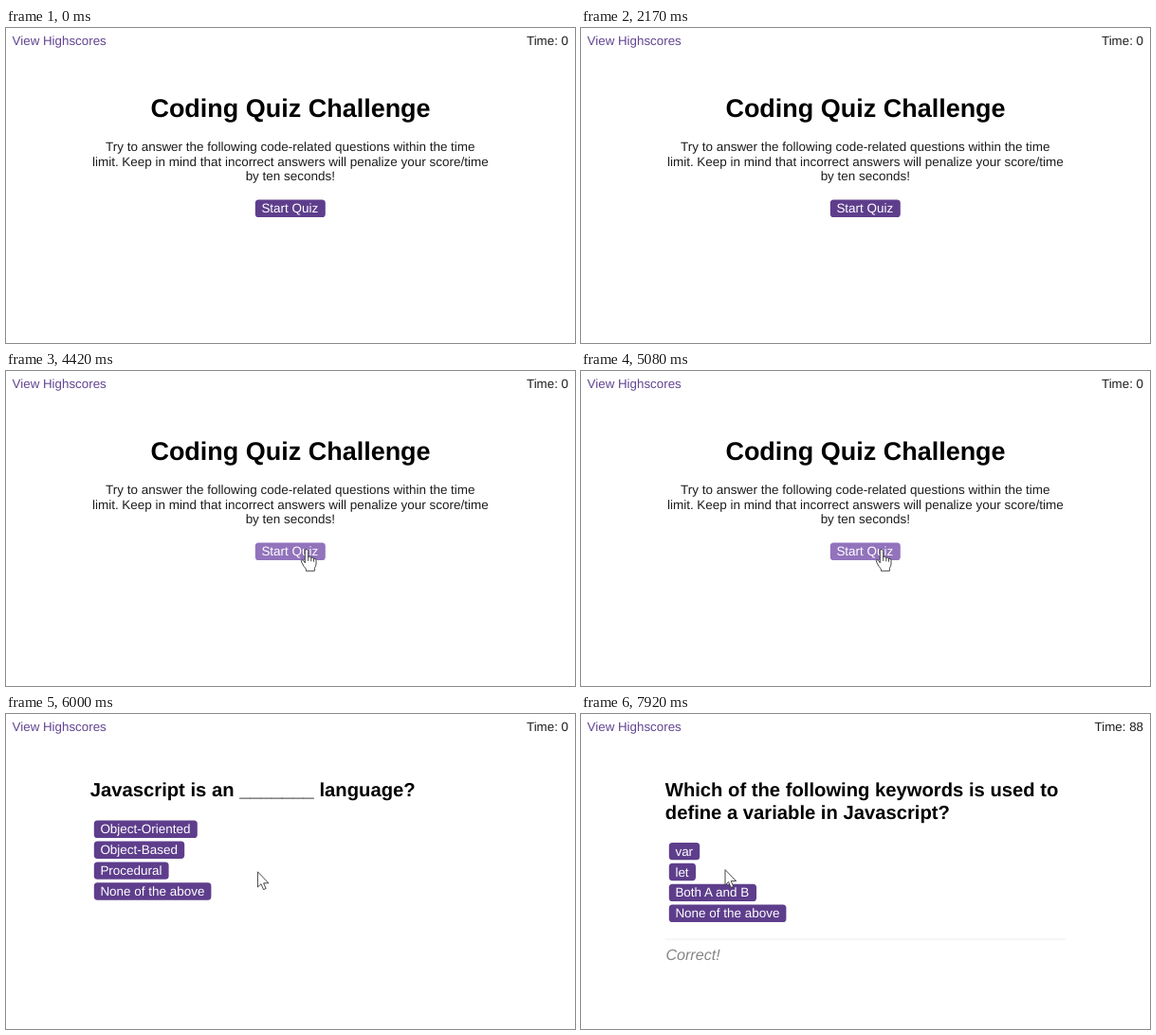
Animation, 600 px wide and 333 px high, one loop 8 s. Source, as an HTML page:

```html
<!DOCTYPE html>
<html lang="en">
<head>
<meta charset="utf-8">
<title>Coding Quiz Challenge</title>
<style>
  html, body { margin: 0; width: 100%; height: 100%; overflow: hidden; background: #fff; }
  svg { display: block; width: 600px; height: 333px; }
  text {
    font: 13.48px "Liberation Sans", Arial, sans-serif;
    fill: #1c1c1c;
    text-rendering: geometricPrecision;
  }
  .link { font-size: 13.35px; fill: #624491; }
  .clock { font-size: 13.35px; text-anchor: end; }
  .title { font-size: 26.97px; font-weight: bold; fill: #000; text-anchor: middle; }
  .intro { text-anchor: middle; }
  .question { font-size: 20.23px; font-weight: bold; fill: #000; }
  .result { font-size: 16.1px; font-style: italic; fill: #858585; }
  .button rect { fill: #5e3e8c; }
  .button.hover rect { fill: #9273bc; }
  .button text { fill: #fff; }
  .cursor { fill: #fff; stroke: #333; stroke-width: 0.9; stroke-linejoin: round; stroke-linecap: round; }
</style>
</head>
<body>
<svg id="stage" viewBox="0 0 600 333"></svg>
<script>
const LOOP = 8000;
const STEP = 1000 / 12;
const stage = document.getElementById('stage');

function add(parent, tag, attrs, content = '') {
  const el = document.createElementNS('http://www.w3.org/2000/svg', tag);
  for (const key in attrs) el.setAttribute(key, attrs[key]);
  el.textContent = content;
  parent.append(el);
  return el;
}

const label = (parent, cls, x, y, content) => add(parent, 'text', { class: cls, x, y }, content);

function makeScene(start, end) {
  return { start, end, group: add(stage, 'g', {}), buttons: [] };
}

function addButton(scene, x, y, w, content) {
  const el = add(scene.group, 'g', { class: 'button' });
  add(el, 'rect', { x, y, width: w, height: 18.4, rx: 3.6 });
  label(el, '', x + 6.6, y + 13.7, content);
  scene.buttons.push({ el, x, y, w, h: 18.4 });
}

function addChoices(scene, top, choices) {
  choices.forEach(([content, w], i) => addButton(scene, 92.8, top + i * 21.9, w, content));
}

label(stage, 'link', 6.6, 17.8, 'View Highscores');
const clock = label(stage, 'clock', 593, 17.8, '');

const intro = makeScene(0, 5250);
label(intro.group, 'title', 300, 94, 'Coding Quiz Challenge');
[
  'Try to answer the following code-related questions within the time',
  'limit. Keep in mind that incorrect answers will penalize your score/time',
  'by ten seconds!'
].forEach((line, i) => label(intro.group, 'intro', 299.8, 130.4 + i * 15.5, line));
addButton(intro, 262.8, 181.6, 74, 'Start Quiz');

const first = makeScene(5250, 7166);
label(first.group, 'question', 88.8, 87.3, 'Javascript is an _______ language?');
addChoices(first, 112.6, [
  ['Object-Oriented', 109], ['Object-Based', 95.4], ['Procedural', 78.8], ['None of the above', 123.6]
]);

const second = makeScene(7166, LOOP);
label(second.group, 'question', 88.8, 87.3, 'Which of the following keywords is used to');
label(second.group, 'question', 88.8, 110.6, 'define a variable in Javascript?');
addChoices(second, 135.9, [
  ['var', 32.4], ['let', 28.2], ['Both A and B', 92.2], ['None of the above', 123.6]
]);
add(second.group, 'rect', { x: 89, y: 237.5, width: 422, height: 1, fill: '#eee' });
label(second.group, 'result', 89.4, 260.4, 'Correct!');

const scenes = [intro, first, second];

const arrow = add(stage, 'path', {
  class: 'cursor',
  d: 'M0 0V15.8L3.6 12.5L6.1 18.4L8.7 17.3L6.2 11.6H11.2Z'
});
const hand = add(stage, 'path', {
  class: 'cursor',
  d: 'M-1.7 14V1.8Q-1.6 0 0 0Q1.6 0 1.7 1.8V8.2Q3.2 6.6 4.8 8.8Q6.4 7.6 7.5 9.8' +
     'Q9.8 9 10 11.6V15.6Q9.8 18 8.4 19.8V22.8H-.6V20.8Q-3 18.4-4.8 14.6' +
     'Q-6.6 11.8-5.2 11Q-3.8 10.6-1.7 14M1.7 8.2V12M4.8 8.8V12.4M7.5 9.8V12.8'
});

// Pointer path: time, x, y
const path = [
  [2416, 566, 148], [2500, 520, 151], [2583, 494, 152], [2900, 478, 152],
  [3416, 458, 152.5], [3583, 454.5, 153], [3830, 400, 187], [4083, 337, 209],
  [4330, 318, 191], [4416, 317, 188.5], [5250, 317, 188.5], [5416, 310.5, 191],
  [5666, 306, 187], [5916, 280, 176], [6250, 222, 141], [6500, 178, 119],
  [6666, 171, 115.5], [7250, 171, 115.5], [7416, 169, 120], [7666, 158, 150],
  [7916, 152, 165]
];

function pointerAt(t) {
  if (t < path[0][0]) return null;
  const i = path.findIndex(p => p[0] > t);
  if (i < 0) return path[path.length - 1].slice(1);
  const [t0, x0, y0] = path[i - 1];
  const [t1, x1, y1] = path[i];
  const k = (t - t0) / (t1 - t0);
  return [x0 + (x1 - x0) * k, y0 + (y1 - y0) * k];
}

const show = (el, on) => el.setAttribute('visibility', on ? 'visible' : 'hidden');

function draw(time) {
  const t = Math.floor(((time % LOOP) + 5) / STEP) * STEP % LOOP;
  clock.textContent = 'Time: ' + (t < 6249 ? 0 : t < 7249 ? 89 : 88);

  const pos = pointerAt(t);
  let over = false;
  for (const scene of scenes) {
    const on = t >= scene.start && t < scene.end;
    scene.group.style.display = on ? '' : 'none';
    for (const b of scene.buttons) {
      const hit = on && pos !== null &&
        pos[0] >= b.x && pos[0] <= b.x + b.w && pos[1] >= b.y && pos[1] <= b.y + b.h;
      b.el.classList.toggle('hover', hit);
      over = over || hit;
    }
  }

  show(arrow, pos && !over);
  show(hand, pos && over);
  if (pos) (over ? hand : arrow).setAttribute('transform', `translate(${pos[0]} ${pos[1]})`);
}

const begin = performance.now();
function tick() {
  draw(performance.now() - begin);
  requestAnimationFrame(tick);
}
tick();
</script>
</body>
</html>
```
